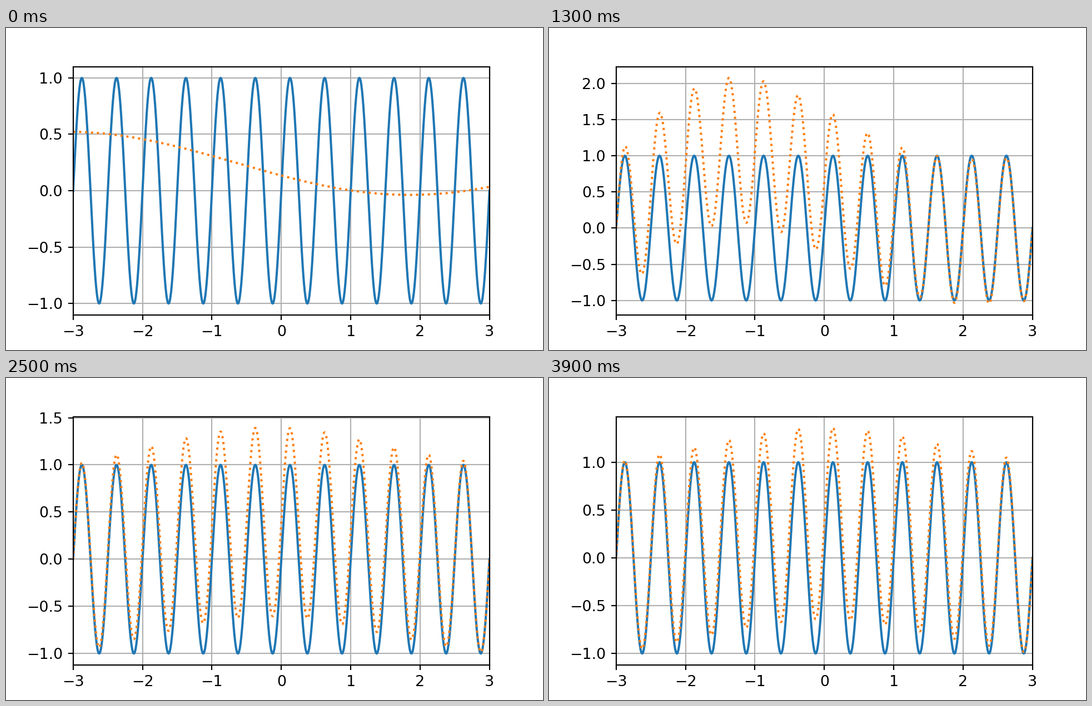
Write a matplotlib script that moves like this. It is 966 px wide and 580 px high and loops after 4 s.

```python
import numpy as np
import matplotlib.pyplot as plt
from matplotlib.animation import FuncAnimation

WIDTH, HEIGHT, DPI = 966, 580, 193.2
FRAMES, INTERVAL = 40, 100

x = np.linspace(-3, 3, 1200)
wave = np.sin(4 * np.pi * x)


def smooth(points):
    """Cubic Hermite curve through (x, y) points, sampled at x."""
    px, py = np.array(points).T
    slope = np.gradient(py, px)
    i = np.clip(np.searchsorted(px, x, side="right") - 1, 0, len(px) - 2)
    h = px[i + 1] - px[i]
    t = (x - px[i]) / h
    return ((1 + 2 * t) * (1 - t) ** 2 * py[i]
            + t * (1 - t) ** 2 * h * slope[i]
            + t * t * (3 - 2 * t) * py[i + 1]
            + t * t * (t - 1) * h * slope[i + 1])


def bump(center, width):
    return np.exp(-((x - center) / width) ** 2)


def fit(*modes):
    """The wave plus low harmonics that vanish at both ends."""
    return wave + sum(c * np.sin(k * np.pi * (x + 3) / 6)
                      for k, c in enumerate(modes, 1))


untrained = 0.243 + 0.28 * np.cos(np.pi * (x + 3.1) / 4.95)

# Early fit: a drifting level, with the wave still missing in two places.
drift = smooth([(-3, -1.32), (-2.3, 0), (-1.4, -0.92), (-0.5, -0.05),
                (0.5, 1.2), (1.35, 2.55), (2.3, 0.75), (3, 2.3)])
rough = drift + wave * (1 - bump(-1.4, 0.35) - bump(1.375, 0.42))

# (frame, ease-out power on the way there, curve)
KEYS = [
    (0, 1, untrained),
    (6, 1, rough),
    (13, 1, fit(0.70, 0.52, 0.06)),
    (21, 2, fit(0.28, 0.05, -0.035)),
    (29, 2, fit(0.39, 0.02, -0.03)),
    (35, 1, fit(0.37, 0.04, -0.045)),
    (39, 3, fit(0.33, 0, -0.03)),
]


def prediction(frame):
    for (f0, _, a), (f1, power, b) in zip(KEYS, KEYS[1:]):
        if frame <= f1:
            t = 1 - (1 - (frame - f0) / (f1 - f0)) ** power
            return a + (b - a) * t
    return KEYS[-1][2]


fig, ax = plt.subplots(figsize=(WIDTH / DPI, HEIGHT / DPI), dpi=DPI)
fig.subplots_adjust(left=120.8 / WIDTH, right=869.7 / WIDTH,
                    bottom=63.45 / HEIGHT, top=510.4 / HEIGHT)
ax.plot(x, wave)
guess, = ax.plot(x, untrained, ":")
ax.set_xlim(-3, 3)
ax.grid(True)


def update(frame):
    guess.set_ydata(prediction(frame))
    ax.relim()
    ax.autoscale_view(scalex=False)
    return guess,


anim = FuncAnimation(fig, update, frames=FRAMES, interval=INTERVAL,
                     init_func=lambda: update(0), repeat=True, repeat_delay=0)
plt.show()
```
